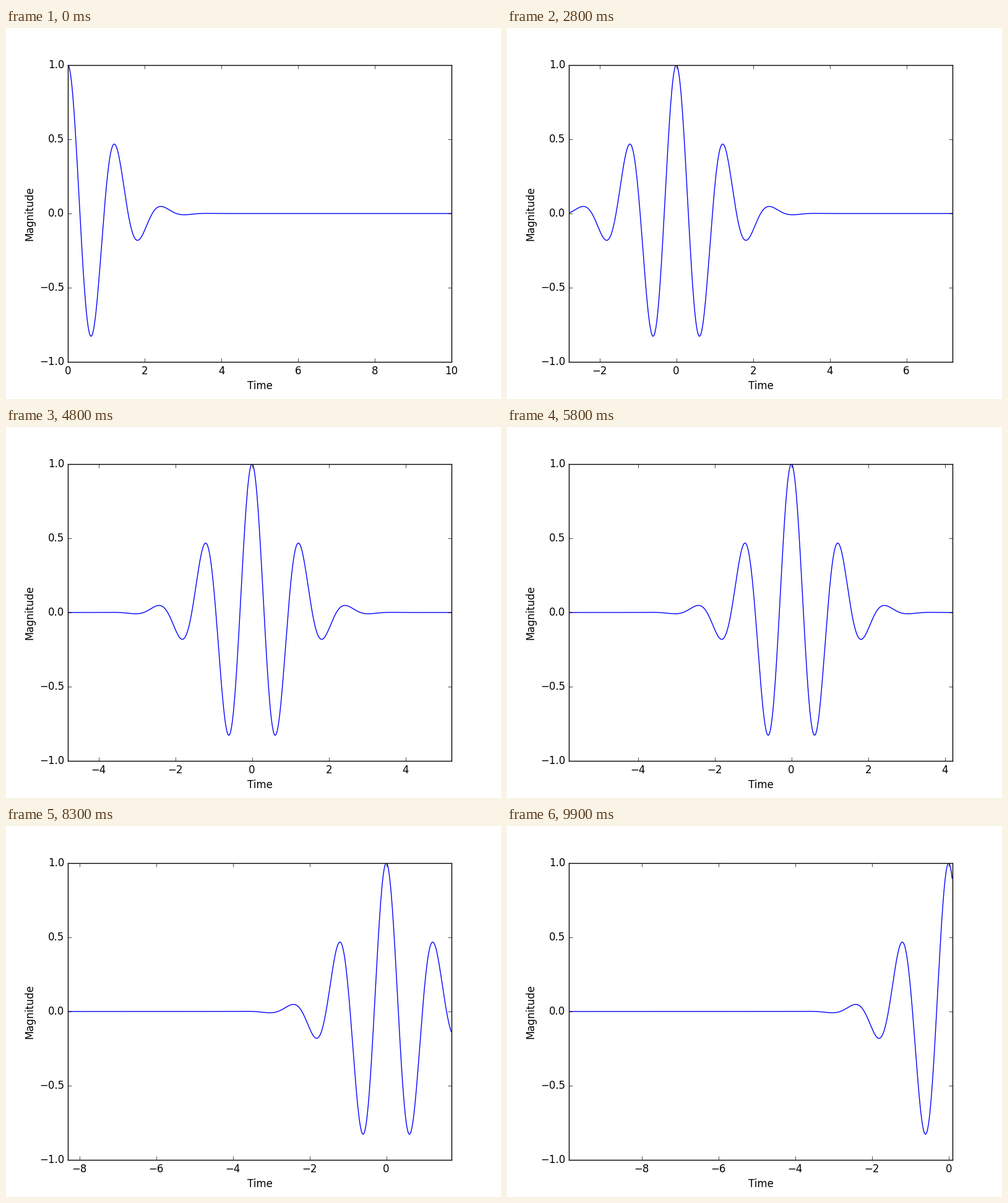
A matplotlib script for the animation above (10 s loop, 800 by 600 pixels).

```python
import numpy as np
import matplotlib.pyplot as plt
from matplotlib.animation import FuncAnimation
from matplotlib.ticker import MultipleLocator

FRAMES = 100
INTERVAL = 100   # ms
SPAN = 10        # visible seconds
STEP = 0.01

plt.style.use("classic")
plt.rcParams["font.family"] = "DejaVu Sans"

fig = plt.figure(figsize=(8, 6), dpi=100, facecolor="white")
ax = fig.add_axes([0.125, 0.1, 0.775, 0.8])
ax.set_xlabel("Time")
ax.set_ylabel("Magnitude")
ax.set_ylim(-1, 1)
ax.xaxis.set_major_locator(MultipleLocator(2))
ax.yaxis.set_major_locator(MultipleLocator(0.5))
line, = ax.plot([], [], color="blue", linewidth=1)

samples = np.arange(round(SPAN / STEP)) * STEP


def wavelet(t):
    return np.exp(-t**2 / 2) * np.cos(5 * t)


def update(frame):
    """Slide the time window back over the wave packet."""
    start = -frame / 10
    t = start + samples
    line.set_data(t, wavelet(t))
    ax.set_xlim(start, (SPAN * 10 - frame) / 10)
    return line,


anim = FuncAnimation(fig, update, frames=FRAMES, init_func=lambda: update(0),
                     interval=INTERVAL, repeat=True, repeat_delay=0)
plt.show()
```
